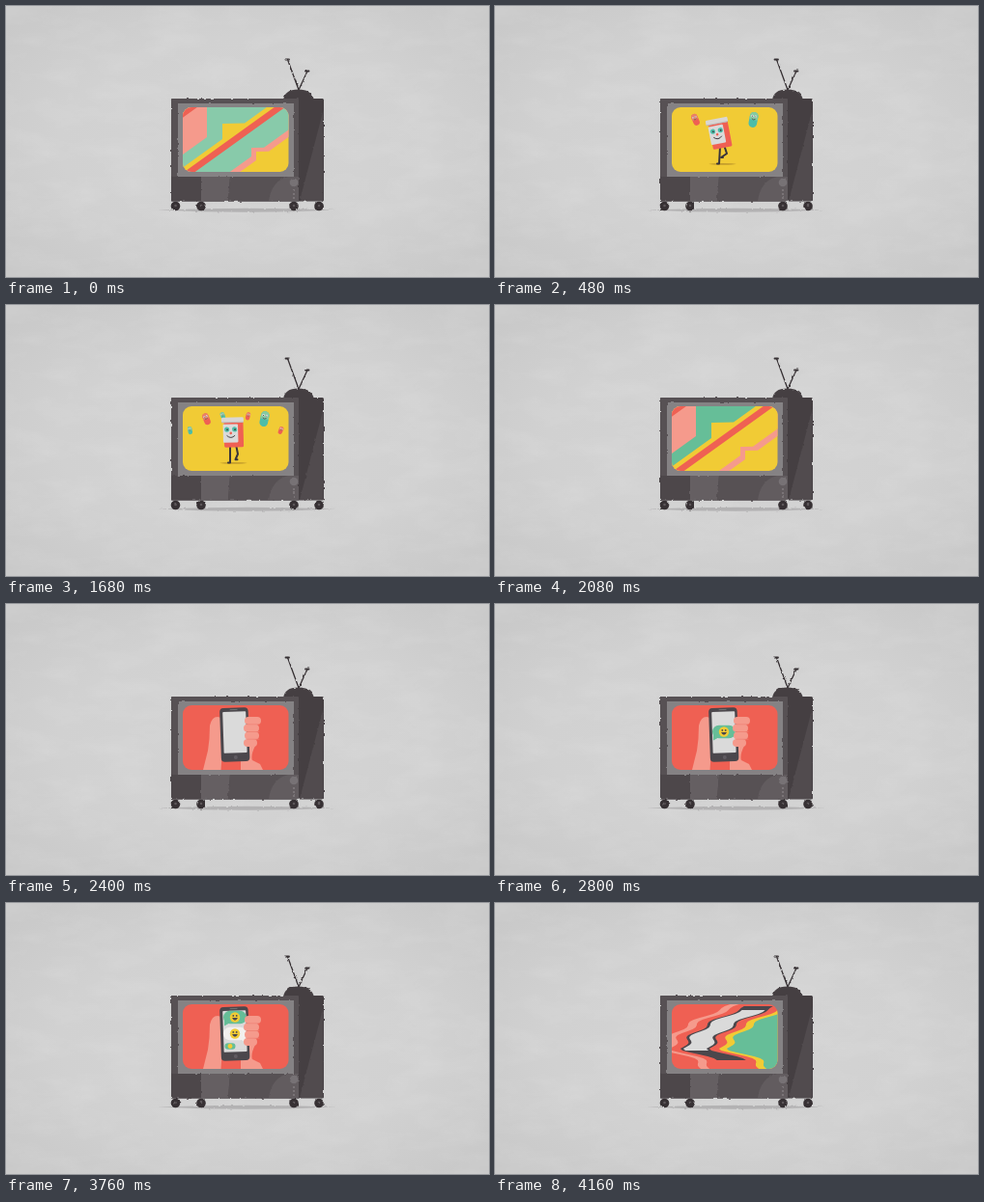
These frames come from a looping animation (500x281 px, 4.24 s). An HTML page:

```html
<!DOCTYPE html>
<html lang="en">
<head>
<meta charset="utf-8">
<title>Television</title>
<style>
  html, body { margin: 0; width: 100%; height: 100%; overflow: hidden; background: #d0d0d0; }
  svg { display: block; width: 100%; height: 100%; }
</style>
</head>
<body>
<svg viewBox="0 0 500 281">
  <defs>
    <radialGradient id="paper" cx=".5" cy=".5" r=".65">
      <stop offset="0" stop-color="#d4d4d4"/>
      <stop offset=".6" stop-color="#d1d1d1"/>
      <stop offset="1" stop-color="#c9c9c9"/>
    </radialGradient>
    <filter id="fibre" x="0" y="0" width="1" height="1">
      <feTurbulence type="fractalNoise" baseFrequency=".02 .05" numOctaves="4" seed="4"/>
      <feColorMatrix values="0 0 0 0 1  0 0 0 0 1  0 0 0 0 1  .2 0 0 0 -.08"/>
    </filter>
    <filter id="rough" x="-.1" y="-.1" width="1.2" height="1.2" color-interpolation-filters="sRGB">
      <feTurbulence id="boil" type="fractalNoise" baseFrequency=".22" numOctaves="2"/>
      <feColorMatrix values="1 0 0 0 0  0 1 0 0 0  0 0 1 0 0  0 0 0 0 1" result="noise"/>
      <feDisplacementMap in="SourceGraphic" in2="noise" scale="2.4" xChannelSelector="R" yChannelSelector="G"/>
    </filter>
    <clipPath id="glass"><rect x="183" y="105" width="109.5" height="67" rx="9"/></clipPath>
  </defs>
  <rect width="500" height="281" fill="url(#paper)"/>
  <rect width="500" height="281" filter="url(#fibre)"/>
  <g id="cabinet" filter="url(#rough)"></g>
  <g id="picture" clip-path="url(#glass)"></g>
</svg>

<script>
const LOOP = 4240, STEP = 80;
const YELLOW = '#f1cb35', RED = '#ef6053', PINK = '#f59a8c', GREEN = '#88caaa',
      MINT = '#66be98', TEAL = '#4dbda8', DARK = '#4b474c', PALE = '#dadada';
const [cabinet, picture, boil] = ['cabinet', 'picture', 'boil'].map(id => document.getElementById(id));

const clamp = v => Math.max(0, Math.min(1, v));
const mix = (a, b, p) => a + (b - a) * p;
const ease = (t, from, length) => {
  const p = clamp((t - from) / length);
  return p * p * (3 - 2 * p);
};
const loop = (count, make) => Array.from({ length: count }, (_, i) => make(i)).join('');
const path = (d, color) => `<path d="${d}" fill="${color}"/>`;
const line = (d, color, width) =>
  `<path d="${d}" fill="none" stroke="${color}" stroke-width="${width}" stroke-linecap="round" stroke-linejoin="round"/>`;
const oval = (x, y, rx, ry, color) => `<ellipse cx="${x}" cy="${y}" rx="${rx}" ry="${ry}" fill="${color}"/>`;
const dot = (x, y, r, color) => oval(x, y, r, r, color);
const box = (x, y, w, h, r, color) =>
  `<rect x="${x}" y="${y}" width="${w}" height="${h}" rx="${r}" fill="${color}"/>`;
const place = (x, y, turn, scale, content) =>
  `<g transform="translate(${x} ${y}) rotate(${turn}) scale(${scale})">${content}</g>`;
const fill = color => box(180, 100, 120, 80, 0, color);
const eyes = (x, y, gap, r, color) => dot(x - gap, y, r, color) + dot(x + gap, y, r, color);

// ---- television ----
const antenna = (x, y) => line(`M303 87L${x} ${y}`, '#363033', 1.3) + line(`M${x - 2} ${y}h3.500`, '#363033', 1.8);
const wheel = x => dot(x, 207.5, 4.8, '#373134') + dot(x, 207, 1.3, '#5d575a');

const television = () =>
  path('M157 211.500Q250 208 341 211.500Q250 216 157 211.500Z', '#b3b2b3') +
  antenna(291.5, 55.5) + antenna(312, 67.5) +
  path('M287 98Q288 86.500 302.500 86.500T319 98Z', '#453f42') +
  box(171, 96, 158, 106.5, 1.5, '#453f42') +
  path('M328.500 108L304 202H328.500Z', '#514b4e') +
  box(171, 96, 132, 81, 1, '#575154') +
  box(171, 177, 132, 25.5, 0, '#4d474a') +
  path('M202 177H232L230 202H202Z', '#655f62') +
  path('M232 177H303V202H230Z', '#575154') +
  path('M303 177V202H272Q275 181 292 177Z', '#625c5f') +
  box(178, 101, 120, 76, 0, '#858284') +
  dot(298, 183, 4.3, '#777275') +
  loop(3, i => dot(298, 191 + 4 * i, 1.1, '#807b7e')) +
  [175.5, 202, 298, 324].map(wheel).join('');

// ---- dancing pill bottle ----
function pill(i, t) {
  const side = i < 3 ? -1 : 1, rank = i % 3, large = rank === 1;
  const red = (rank + (side > 0)) % 2;
  const size = large ? mix(.95, .13 * side + .95, 1) : .55;
  const sway = Math.sin(t / 170 + i * 2);
  return place(237.5 + side * (13 + 17 * rank), 115.5 + 3.4 * rank * rank + sway,
    side * 17 + sway * 6, size * ease(t, large ? 240 : 720, 200),
    box(-4, -7.5, 8, 15, 4, red ? RED : TEAL) +
    path('M-4 0V-3.500A4 4 0 0 1 4 -3.500V0Z', red ? '#e98267' : '#86c9a0') +
    eyes(0, -3.4, 1.6, 1.1, '#eee') + eyes(0, -3.2, 1.6, .55, DARK) +
    line('M-1.500 -.6Q0 .8 1.500 -.6', DARK, .7));
}

function bottle(t) {
  const p = (Math.cos((t - 1280) / 1600 * 6 * Math.PI) + 1) / 2;
  const ink = '#39353a';
  const body =
    box(-9, -12, 20, 27, 1.5, RED) + box(-10, -9, 15.5, 19, 1, PALE) +
    box(-11.5, -16, 23, 5.5, 1.5, '#d9d6d4') + line('M-11 -11H11', '#b9b4b1', .8) +
    eyes(-2, -3.5, 4, 2.6, TEAL) + eyes(-1.6, -3.3, 4, .9, ink) +
    dot(-2, .3, 1.3, RED) + line('M-6 3Q-2 7 2 3', ink, .9);
  return oval(235.5, 163.8, 14, .9, '#c39d2c') +
    line(`M${mix(233, 231, p)} 146L232 163.500h-2`, ink, 2) +
    line(`M${mix(238, 239, p)} 147L240 ${mix(153, 156, p)}L${mix(234, 241, p)} ${mix(157, 163.5, p)}h2`, ink, 2) +
    place(mix(232, 237.5, p), 132.5, mix(-11, 8, p), 1, body);
}

const pillScene = t => fill(YELLOW) + loop(6, i => pill(i, t)) + bottle(t);

// ---- hands with a phone ----
const face = dot(0, 0, 5.2, YELLOW) + eyes(0, -1.6, 1.7, .9, DARK) + path('M-3 .5H3Q0 6 -3 .5Z', DARK);

const bubble = (y, color, side, scale) => place(237, y, 0, scale,
  box(-12, -6.7, 24, 13.4, 6.7, color) + path(`M${11 * side} 2v7L${4 * side} 5Z`, color) + face);

function phoneScene(t) {
  const pop = at => ease(t, at, 160);
  return fill(RED) +
    path('M202 180L209 152Q211 140 211 126Q213 117 219 117Q224 117 224 124V150L222 180Z', PINK) +
    path('M243 180V147H258Q253 157 255 162L263 166L270 180Z', PINK) +
    place(237, 135.5, -2, 1,
      box(-15, -28, 29.5, 56, 4, DARK) + box(-12, -24, 24, 43, 1, PALE) +
      line('M-4 -26H3', '#777', .9) + dot(0, 23.5, 2, '#605b61')) +
    bubble(mix(132.5, 118.5, pop(2960)), MINT, -1, pop(2560)) +
    bubble(135.5, '#f2f0ee', 1, pop(3000)) +
    place(232, 148.5, 0, pop(3240), box(-5.5, -3.3, 11, 6.6, 3.3, MINT) + dot(0, 0, 2.4, YELLOW)) +
    loop(4, i => box(247 - i % 2, 117 + 7.7 * i, 17 - i, 8, 4, PINK)) +
    loop(3, i => line(`M250 ${124.8 + 7.7 * i}h12`, '#ee8073', .7));
}

// ---- diagonal bands: straight edges, each with one jagged notch ----
const SLOPE = .72;

function band(x, y, notch, color) {
  const far = 130;
  return path(`M${x - far} ${y + far * SLOPE}L${x} ${y}v${-.7 * notch}` +
    `L${x + notch} ${y - SLOPE * notch}l${far} ${-far * SLOPE}V-150H${x - far}Z`, color);
}

const bands = (shift, inner, outer) => place(shift, 0, 0, 1,
  band(259, 160, 13, PINK) + band(254, 156, 13, inner) +
  band(243, 138, 0, RED) + band(236, 135, 0, YELLOW) +
  band(224, 138, 23, outer) + band(208, 136, 45, PINK) + band(184, 115, 0, RED));

// ---- picture bent sideways, row by row ----
function bend(y) {
  const pull = y < 152
    ? 73 * ((152 - y) / 47) ** 1.75
    : 41 * (1 - ((172 - y) / 20) ** 2);
  return pull - 28 + 4 * Math.sin((y - 126) * .4);
}

function ribbon(left, right, top, bottom, color, amount) {
  const rows = Array.from({ length: Math.ceil((bottom - top) / 2) + 1 }, (_, i) => Math.min(top + 2 * i, bottom));
  const side = (x, ys) => ys.map(y => `${x + amount * bend(y)},${y}`).join(' ');
  return path(`M${side(left, rows)} ${side(right, [...rows].reverse())}Z`, color);
}

const bentPhone = (amount, edge) => fill(RED) +
  ribbon(202, 211, 105, 172, PINK, amount) +
  ribbon(222, 252, 107, 163, DARK, amount) +
  ribbon(225, 249, 111, 153, PALE, amount) +
  ribbon(edge, 400, 105, 172, YELLOW, amount) +
  ribbon(edge + 8, 400, 105, 172, MINT, amount);

// Frames away from the middle of a change; the second change runs backwards.
function wipePhase(t) {
  if (t > 4000) return (t - LOOP) / STEP;
  return (t < 1000 ? t : 2080 - t) / STEP;
}

function scene(t) {
  const phase = wipePhase(t), leaving = t < 1000;
  if (Math.abs(phase) > 2) return t < 2080 ? pillScene(t) : phoneScene(t);
  if (phase < 0) return bentPhone(mix(1.6, .6, -phase / 2 + .1), 220 - 42 * phase);
  return (phase > 1 ? pillScene(t) : fill(YELLOW)) +
    bands(-46 * phase, leaving ? GREEN : YELLOW, leaving ? GREEN : MINT);
}

cabinet.innerHTML = television();
const begin = performance.now();
let shown = -1;
function draw(now) {
  const t = Math.floor(Math.max(0, now - begin) % LOOP / STEP) * STEP;
  if (t !== shown) {
    shown = t;
    picture.innerHTML = scene(t);
    boil.setAttribute('seed', 1 + t / STEP % 4);
  }
  requestAnimationFrame(draw);
}
draw(begin);
</script>
</body>
</html>
```
